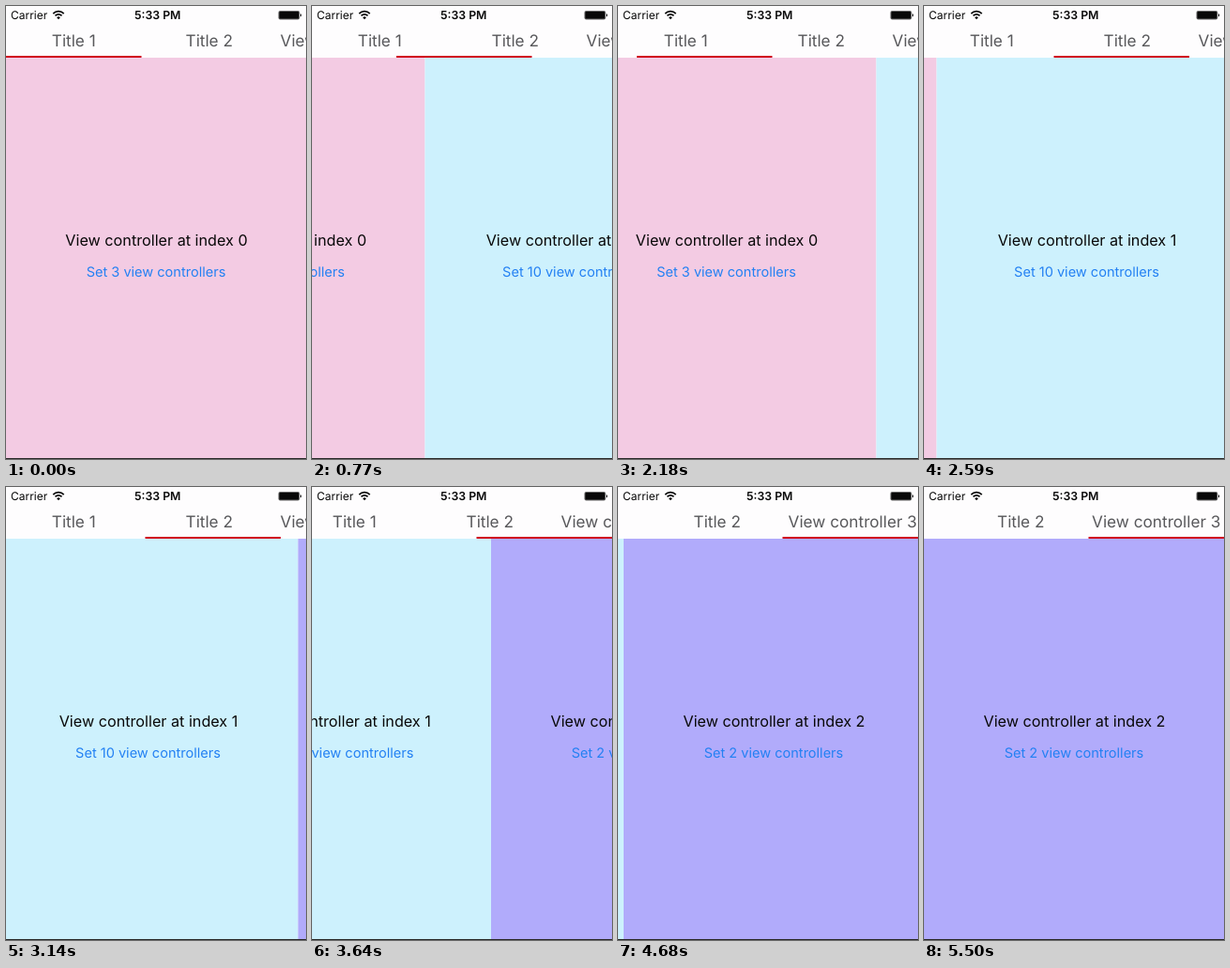
An HTML page that plays this animation: 320 by 482 pixels, repeating every 5.55 s.

```html
<!DOCTYPE html>
<html lang="en">
<head>
<meta charset="utf-8">
<title>Paged tabs</title>
<style>
  html, body { margin: 0; width: 100%; height: 100%; overflow: hidden; background: #fefdfe; }
  svg { display: block; width: 320px; height: 482px; font-family: Inter, Roboto, sans-serif; }
  text { text-anchor: middle; text-rendering: geometricPrecision; }
  .tab { font-size: 17.2px; fill: #58585b; }
  .label { font-size: 16.2px; fill: #080808; }
  .link { font-size: 14.55px; fill: #2380f3; }
  .status { font-size: 12px; fill: #080808; }
  .start { text-anchor: start; }
  .clock { font-size: 12.3px; font-weight: 600; }
</style>
</head>
<body>
<svg viewBox="0 0 320 482">
  <rect width="320" height="482" fill="#fefdfe"/>
  <g id="pages"></g>
  <g id="tabs"></g>
  <rect id="bar" y="53" width="144.5" height="2" fill="#d0021b"/>
  <rect y="481" width="320" height="1" fill="#2a2a2a"/>

  <text class="status start" x="5" y="14">Carrier</text>
  <text class="status clock" x="161.7" y="14">5:33 PM</text>
  <g fill="none" stroke="#080808" stroke-width="1.7">
    <path d="M50.3 8.1a8 8 0 0 1 11.4 0M52.5 10.4a4.9 4.9 0 0 1 7 0"/>
    <path d="M56 14.2l-1.9-2a2.7 2.7 0 0 1 3.8 0z" fill="#080808" stroke="none"/>
  </g>
  <rect x="290.5" y="5" width="22.8" height="9.5" rx="2" fill="#666"/>
  <rect x="291.5" y="6" width="20.8" height="7.5" rx="1" fill="#080808"/>
  <path d="M314 8.2a1.7 1.7 0 0 1 0 3.2z" fill="#080808"/>
</svg>
<script>
  const LOOP = 5550, FPS = 22, WIDTH = 320, TAB = 144.5;
  const PAGES = [
    { title: 'Title 1', color: '#f3cbe3', next: 3 },
    { title: 'Title 2', color: '#cdf1fd', next: 10 },
    { title: 'View controller 3', color: '#b1abfb', next: 2 },
  ];

  // Swipe path: [time in ms, page position]
  const SWIPE = [
    [0, 0], [450, .3], [1020, .77], [1450, .606], [2130, .125], [2180, .139],
    [2410, .77], [2590, .958], [2950, 1], [3050, 1.005], [3640, 1.403],
    [4090, 1.775], [4450, 1.945], [4800, 1.99], [5320, 2], [LOOP, 2],
  ];

  const byId = id => document.getElementById(id);

  function add(parent, tag, attrs, content = '') {
    const el = document.createElementNS('http://www.w3.org/2000/svg', tag);
    for (const key in attrs) el.setAttribute(key, attrs[key]);
    el.textContent = content;
    return parent.appendChild(el);
  }

  PAGES.forEach(({ title, color, next }, i) => {
    const page = add(byId('pages'), 'g', { transform: `translate(${i * WIDTH})` });
    add(page, 'rect', { y: 55, width: WIDTH, height: 426, fill: color });
    add(page, 'text', { class: 'label', x: 160.5, y: 254.5 }, `View controller at index ${i}`);
    add(page, 'text', { class: 'link', x: 160, y: 288 }, `Set ${next} view controllers`);
    add(byId('tabs'), 'text', { class: 'tab', x: (i + .5) * TAB, y: 43 }, title);
  });

  const slope = i => (SWIPE[i + 1][1] - SWIPE[i][1]) / (SWIPE[i + 1][0] - SWIPE[i][0]);

  // Harmonic mean keeps the curve from overshooting its points
  function tangent(i) {
    if (i === 0 || i === SWIPE.length - 1) return 0;
    const a = slope(i - 1), b = slope(i);
    return a * b > 0 ? 2 * a * b / (a + b) : 0;
  }

  function position(t) {
    let i = 0;
    while (i < SWIPE.length - 2 && t >= SWIPE[i + 1][0]) i++;
    const [t0, p0] = SWIPE[i], [t1, p1] = SWIPE[i + 1];
    const h = t1 - t0, u = (t - t0) / h, v = 1 - u;
    return v * v * ((1 + 2 * u) * p0 + u * h * tangent(i))
         + u * u * ((1 + 2 * v) * p1 - v * h * tangent(i + 1));
  }

  // Snap to half pixels, as on a double-density screen
  const move = (id, x) => byId(id).setAttribute('transform', `translate(${Math.round(x * 2) / 2})`);

  function draw() {
    const time = performance.now() % LOOP;
    const step = Math.floor((time + 5) * FPS / 1000);
    const p = position(Math.min(LOOP, Math.round(step * 100 / FPS) * 10));
    const scroll = Math.max(0, (p + 1) * TAB - WIDTH);
    move('pages', -p * WIDTH);
    move('tabs', -scroll);
    move('bar', p * TAB - scroll);
    requestAnimationFrame(draw);
  }

  draw();
</script>
</body>
</html>
```
